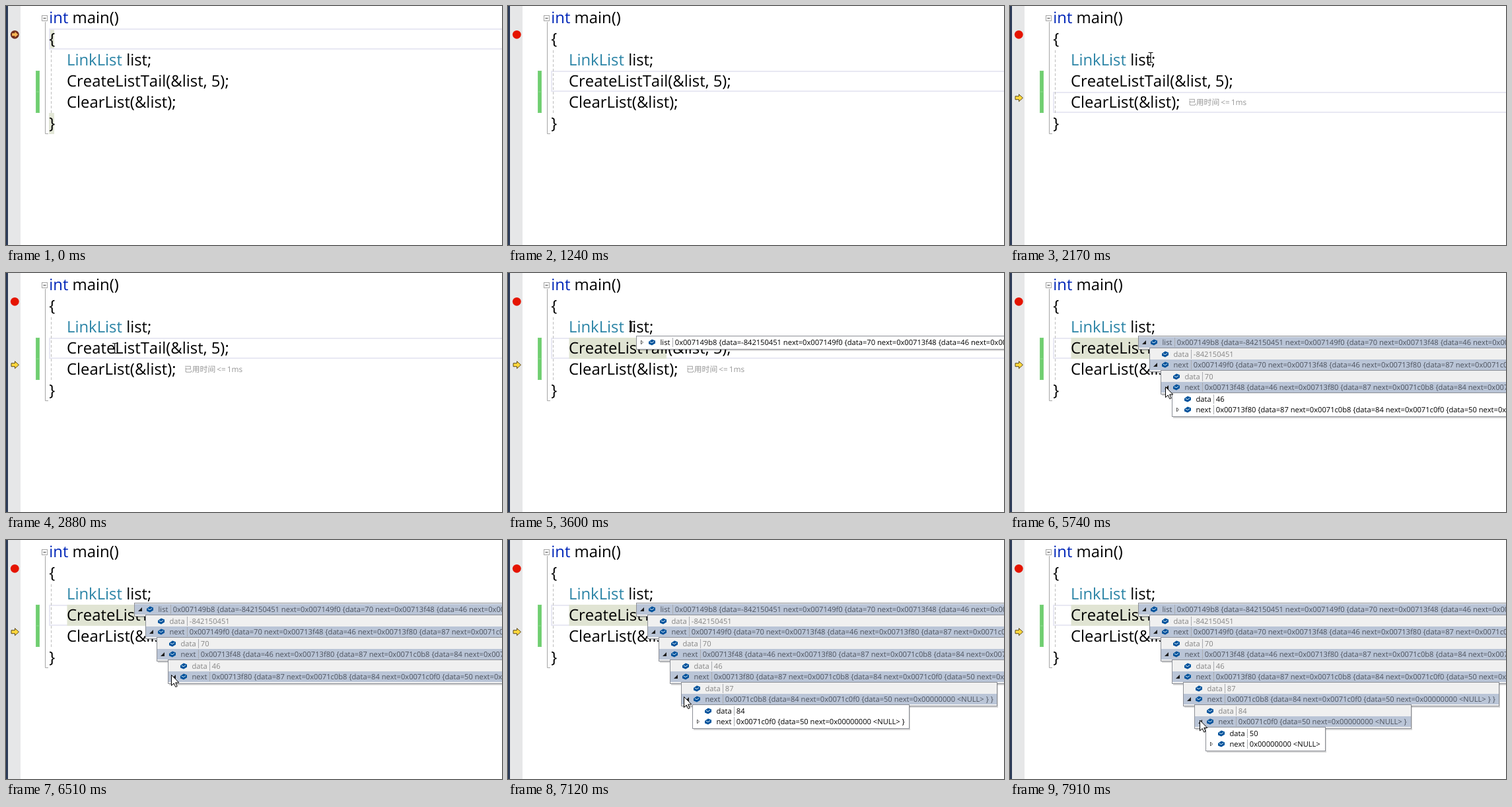
An HTML page for the animation above (8000 ms loop, 751 px wide and 362 px high).

```html
<!DOCTYPE html>
<html lang="zh">
<head>
<meta charset="utf-8">
<title>Debugger data tips</title>
<style>
  html, body { margin: 0; width: 100%; height: 100%; overflow: hidden; background: #fff; }
  svg { display: block; }
  text { white-space: pre; text-rendering: geometricPrecision; font-kerning: none; }
  .code { font: 23.9px "Open Sans", "Noto Sans", sans-serif; fill: #000; }
  .elapsed { font: 11.8px "Open Sans", "Noto Sans CJK SC", "Noto Sans CJK", sans-serif; word-spacing: -1px; fill: #969696; }
  .tip { visibility: hidden; font: 11.15px "Open Sans", "Noto Sans", sans-serif; fill: #000; }
  .tip.open { visibility: visible; }
  .frame { fill: #fff; stroke: #8c8f96; }
  .shadow { fill: #000; opacity: .16; }
  .back { fill: none; }
  .hover .back { fill: #fdf4bf; }
  .rule { stroke: #a9abb0; }
  .closed { fill: #fff; stroke: #555; }
  .opened { fill: #1e1e1e; display: none; }
  .expanded .frame { fill: #f0f0f0; }
  .expanded { fill: #858585; }
  .expanded .parent { fill: #4d535e; }
  .expanded .parent .back { fill: #bac5d7; }
  .expanded .closed { display: none; }
  .expanded .opened { display: inline; }
</style>
</head>
<body>
<svg id="stage" width="751" height="362" viewBox="0 0 751 362">
  <defs>
    <g id="cube">
      <path d="M-5-1 0-4.5 5-2.5V1.5L0 4.5-5 2.5Z" fill="#00539c"/>
      <path d="M-3.2-.7 0 .7 3.2-1.6" fill="none" stroke="#dbe8f4"/>
    </g>
    <path id="step" d="M-5.5-2.5H0V-5.5L6 0 0 5.5V2.5H-5.5Z"/>
  </defs>

  <rect width="3" height="362" fill="#2b3a56"/>
  <rect x="3" width="19" height="362" fill="#e6e7e8"/>
  <g fill="#6fce70" stroke="#7fd480">
    <rect x="45.5" y="98.5" width="5" height="31"/>
    <rect x="45.5" y="130.5" width="5" height="31"/>
  </g>

  <g id="braces" fill="#e2e6d6">
    <rect x="65" y="34" width="8" height="32"/>
    <rect x="65" y="162" width="8" height="32"/>
  </g>
  <rect id="currentLine" x="66" width="700" height="30" fill="none" stroke="#e8e8f3" stroke-width="2"/>
  <rect id="word" x="92.5" y="98" width="147.5" height="32" fill="#e0e4d3"/>

  <g fill="none" stroke="#a5a5a5">
    <rect x="54.5" y="14.5" width="8" height="8" fill="#fff"/>
    <path d="M56.5 18.5h4" stroke="#444"/>
    <path d="M59.5 24V193.5H64"/>
    <path d="M68.5 67V162" stroke="#bdbdbd" stroke-dasharray="4 3"/>
  </g>

  <g id="code" class="code"></g>
  <text id="elapsed" class="elapsed">已用时间 &lt;= 1ms</text>
  <rect id="caret" x="65" y="34" width="2" height="31"/>

  <circle id="breakpoint" cx="13.3" cy="43.3" r="6.4"/>
  <use id="pointer" href="#step"/>

  <g id="tips"></g>

  <path id="beam" d="M-3.5-7.5H-1L0-6.5 1-7.5H3.5M0-6.5V6.5M-3.5 7.5H-1L0 6.5 1 7.5H3.5" fill="none" stroke="#111" stroke-width="1.2"/>
  <path id="arrow" d="M.5.5V16.5L4.2 13 6.8 18.6 9.2 17.6 6.7 12H11.8Z" fill="#fff" stroke="#000"/>
</svg>

<script>
const LOOP = 8000;
const byId = id => document.getElementById(id);

function add(parent, tag, attrs, content = '') {
  const el = document.createElementNS('http://www.w3.org/2000/svg', tag);
  for (const key in attrs) el.setAttribute(key, attrs[key]);
  el.textContent = content;
  return parent.appendChild(el);
}

// Code listing
const lineTop = i => 2 + 32 * i;
const lines = ['int main()', '{', 'LinkList list;', 'CreateListTail(&list, 5);', 'ClearList(&list);', '}'];
const keywords = { int: '#0026b8', LinkList: '#2b84a6' };
lines.forEach((line, i) => {
  const indented = i > 1 && i < 5;
  const text = add(byId('code'), 'text', { x: indented ? 92 : 65.2, y: lineTop(i) + 24.4 });
  const [first, ...rest] = line.split(' ');
  const color = keywords[first];
  if (color) {
    add(text, 'tspan', { fill: color }, first);
    add(text, 'tspan', {}, ' ' + rest.join(' '));
  } else {
    text.textContent = line;
  }
});

// Linked list shown in the data tips
const nodes = [
  ['007149b8', -842150451], ['007149f0', 70], ['00713f48', 46],
  ['00713f80', 87], ['0071c0b8', 84], ['0071c0f0', 50],
];
const describe = i => i < nodes.length
  ? `0x${nodes[i][0]} {data=${nodes[i][1]} next=${describe(i + 1)} }`
  : '0x00000000 <NULL>';

const openTimes = [3600, 4430, 5120, 5740, 6590, 7120, 7830];
const expandTimes = [4430, 5120, 5740, 6510, 7120, 7760, Infinity];

function addRow(tip, x, y, width, label, value, expandable) {
  const row = add(tip, 'g', { class: expandable ? 'parent' : 'leaf' });
  const mid = y + 8;
  const rule = x + (label === 'list' ? 55 : 63);
  add(row, 'rect', { class: 'back', x: x + 1, y, width: width - 1, height: 16 });
  if (expandable) {
    add(row, 'path', { class: 'closed', d: `M${x + 7.5} ${mid - 3}l3 3-3 3Z` });
    add(row, 'path', { class: 'opened', d: `M${x + 12} ${mid - 3}v6h-6Z` });
  }
  add(row, 'use', { href: '#cube', x: x + 24, y: mid });
  add(row, 'text', { x: x + 36.5, y: mid + 4 }, label);
  add(row, 'path', { class: 'rule', d: `M${rule + .5} ${y + 1}v14` });
  add(row, 'text', { x: rule + 3.8, y: mid + 4 }, value);
  return { el: row, y };
}

const tips = openTimes.map((_, n) => {
  const x = 194 + 17 * n;
  const y = n ? 79 + 34 * n : 95;
  const width = n === 6 ? 181 : 328 + 150 * (5 - n);
  const height = n ? 36 : 20;
  const el = add(byId('tips'), 'g', { class: 'tip' });
  add(el, 'rect', { class: 'shadow', x: x + 2, y: y + 2, width, height: height + 1 });
  add(el, 'rect', { class: 'frame', x: x + .5, y: y + .5, width, height });
  const rows = n
    ? [addRow(el, x, y + 2, width, 'data', nodes[n - 1][1], false),
       addRow(el, x, y + 18, width, 'next', describe(n), true)]
    : [addRow(el, x, y + 2, width, 'list', describe(0), true)];
  return { el, x, rows };
});

// Mouse paths: [time, x, y]
const beamPath = [
  [70, 717.5, 185], [1549, 717.5, 185], [1550, 412, 23], [1850, 83, 49], [2000, 83, 49],
  [2090, 225, 78], [2170, 213, 78], [2320, 213, 78], [2620, 180, 114], [2960, 160, 114],
  [3110, 160, 114], [3430, 187, 83], [3600, 187, 81], [3659, 187, 81], [3660, 75, 81],
  [3890, 75, 81], [4130, 190, 94],
];
const arrowPath = [
  [4130, 197, 98], [4280, 201, 101], [4570, 201, 101], [4660, 214, 120], [4820, 221, 136],
  [5240, 221, 136], [5510, 235, 172], [5800, 235, 172], [6120, 250, 204], [6590, 250, 204],
  [6890, 266, 237], [7250, 266, 237], [7650, 287, 272.5],
];

function along(path, t) {
  const next = path.findIndex(p => p[0] > t);
  if (next < 1) return path[next ? path.length - 1 : 0].slice(1);
  const [t0, x0, y0] = path[next - 1], [t1, x1, y1] = path[next];
  const k = (t - t0) / (t1 - t0);
  return [x0 + (x1 - x0) * k, y0 + (y1 - y0) * k];
}

const within = (t, from, to) => t >= from && t < to;
const show = (id, on) => byId(id).style.display = on ? '' : 'none';
const move = (id, x, y) => byId(id).setAttribute('transform', `translate(${x} ${y})`);
const set = (id, attrs) => { for (const key in attrs) byId(id).setAttribute(key, attrs[key]); };

function renderEditor(t) {
  const started = t >= 770;
  const selected = !started ? 1 : within(t, 1310, 2700) ? 4 : 3;
  const executing = !started ? 1 : t < 1310 ? 3 : 4;
  set('currentLine', { y: lineTop(selected) + 1 });
  show('braces', !started);
  show('caret', within(t, 460, 770));
  show('word', t >= 3110);

  set('breakpoint', { fill: started ? '#e51400' : '#6f2c1d' });
  set('pointer', started ? { fill: '#ffd83c', stroke: '#5c4a1c' } : { fill: '#f8b755', stroke: 'none' });
  byId('pointer').setAttribute('transform',
    `translate(13.5 ${lineTop(executing) + 9.2}) scale(${started ? 1 : .8})`);
  show('pointer', !within(t, 770, 840) && !within(t, 1240, 1310));

  show('elapsed', within(t, 840, 1240) || t >= 1380);
  set('elapsed', { x: executing === 3 ? 350 : 270, y: lineTop(executing) + 20 });
}

function renderTips(t, mouse) {
  const deepest = openTimes.filter(time => t >= time).length - 1;
  tips.forEach(({ el, x, rows }, n) => {
    const expanded = t >= expandTimes[n];
    el.classList.toggle('open', n <= deepest);
    el.classList.toggle('expanded', expanded);
    for (const row of rows) {
      const hovered = mouse && n === deepest && !expanded
        && mouse[0] >= x && within(mouse[1], row.y, row.y + 16);
      row.el.classList.toggle('hover', Boolean(hovered));
    }
  });
}

function render(t) {
  const onTip = t >= 4130;
  const mouse = along(onTip ? arrowPath : beamPath, t);
  renderEditor(t);
  renderTips(t, onTip && mouse);
  show('beam', within(t, 70, 140) || within(t, 1550, 4130));
  show('arrow', onTip);
  move(onTip ? 'arrow' : 'beam', ...mouse);
}

const start = performance.now();
function tick() {
  render((performance.now() - start) % LOOP);
  requestAnimationFrame(tick);
}
tick();
</script>
</body>
</html>
```
